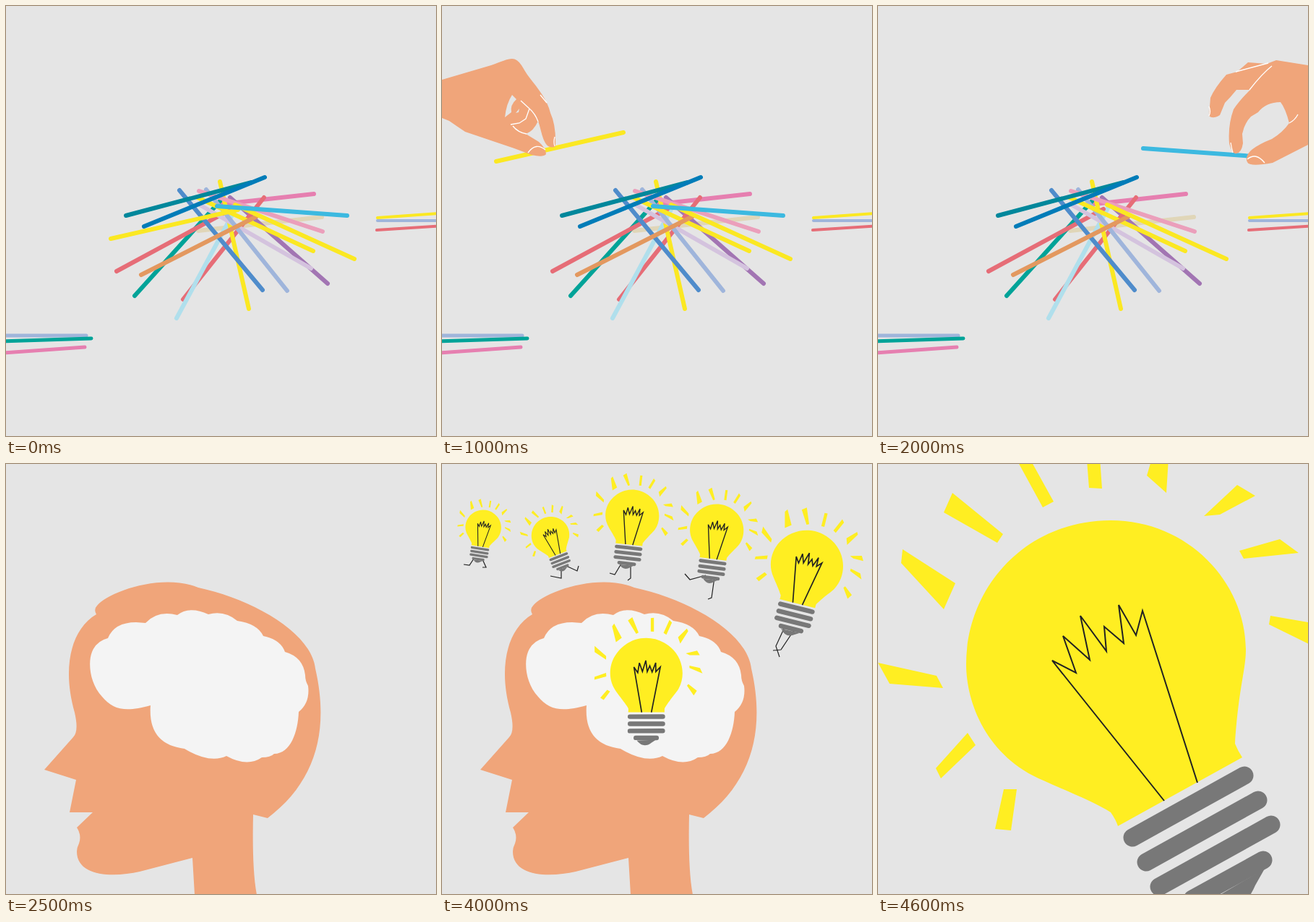
An HTML page for the animation above (5.1 s loop, 595 by 595 pixels).

```html
<!DOCTYPE html>
<html lang="en">
<head>
<meta charset="utf-8">
<title>Picking up ideas</title>
<style>
  html, body { margin: 0; height: 100%; overflow: hidden; background: #e5e5e5; }
  svg { display: block; width: 100vw; height: 100vh; }
  .stick { fill: none; stroke-width: 6; stroke-linecap: round; }
  .skin { fill: #f0a57a; }
  .hole { fill: #e5e5e5; }
  .crease { fill: none; stroke: #fff; stroke-width: 1.3; }
  .legs { fill: none; stroke: #222; stroke-width: 1.2; }
  .glow { fill: #ffee22; }
  .ridge { fill: none; stroke: #787878; stroke-width: 25; stroke-linecap: round; }
  .wire { fill: none; stroke: #222; vector-effect: non-scaling-stroke; }
</style>
</head>
<body>
<!-- data-t: start and end of visibility in ms -->
<svg viewBox="0 0 595 595">
  <defs>
    <g id="bulb" transform="rotate(28.9) translate(-316 -271)">
      <path class="glow" d="M332 501Q329 492 322 482C300 468 255 450 229 438C150 405 122 330 122 277C122 170 205 78 322 78C430 78 509 165 509 257C509 285 499 310 494 387Q498 397 504 406Z"/>
      <path class="glow" d="M174 450L192 450 184 507 162 505ZM124 372L135 389 87 435 80 421ZM0 275L81 293 90 310 16 304ZM34 118L107 165 91 201 32 137ZM103 40L173 97 165 109 91 67ZM193 -4L207 -13 243 52 228 60Z"/>
      <path class="glow" d="M286 -44L305 -37 310 34 292 33ZM391 -48L404 -40 399 40 372 16ZM497 29L522 44 473 70 451 72ZM500 120L556 104 582 123 506 131ZM543 210L601 220 598 250 541 222Z"/>
      <path class="ridge" d="M352 517L507 431M371 551L526 465M389 585L544 499M435 602L533 548"/>
      <path fill="#787878" d="M535 560L522 583Q500 635 446 612Z"/>
      <path class="wire" d="M396 466L241 272 274 289 256 238 293 271 280 210 316 259 313 225 340 248 333 195 357 237 366 203 442 441"/>
    </g>
    <g id="leftHand">
      <path class="skin" d="M-40 113L0 102 68 82C82 77 90 73 97 73Q104 73 110 82C113 87 117 94 121 99C132 113 146 130 150 148Q158 165 157 194Q153 197 147 194C139 188 137 170 133 159Q127 173 116 177L134 188Q144 197 144 205Q140 210 124 206L100 197 32 174Q20 166 10 159L0 155-40 142Z"/>
      <path class="hole" d="M97 123L103 129Q94 137 96 147L87 154Q89 135 97 123ZM102 148L107 142 106 147Z"/>
      <path class="crease" d="M109 131L121 142Q129 149 133 160M121 142L116 156 107 162 95 164M98 166Q105 175 117 177M136 123L145 134M156 181Q154 189 156 194M119 203Q130 188 143 199"/>
    </g>
    <g id="rightHand">
      <path class="skin" d="M680 105L595 82 551 75 538 80 512 78 497 91 482 95Q466 113 460 127L458 152Q463 157 473 151L480 134Q488 126 496 116L515 116Q500 131 492 143Q484 165 486 190Q490 206 496 204Q503 203 505 190L504 177Q507 162 516 153L526 147Q537 133 557 133Q564 142 569 162Q560 175 545 184Q527 191 517 199Q507 208 511 216Q514 223 546 217L595 192 612 187 680 180Z"/>
      <path class="crease" d="M495 91L540 79M545 83Q532 93 514 116M458 139Q461 146 458 152M488 189Q489 196 491 203M511 212Q523 202 535 217M581 150Q577 158 569 162"/>
    </g>
  </defs>

  <g data-t="0 2500">
    <g class="stick">
      <path stroke="#e0d6b8" d="M266 311L437 292"/>
      <path stroke="#e67fb0" d="M300 274L426 260"/>
      <path stroke="#a275b3" d="M310 265L445 384"/>
      <path stroke="#e66d77" d="M245 406L357 265"/>
      <path stroke="#00a398" d="M178 401L297 269"/>
      <path stroke="#b0dfec" d="M236 432L320 276"/>
      <path stroke="#fbe822" d="M296 243L336 419"/>
      <path stroke="#e66d77" d="M153 367L312 281"/>
      <path stroke="#d4c3de" d="M266 274L422 363"/>
      <path stroke="#9fb5db" d="M277 254L389 394"/>
      <path stroke="#fbe822" d="M265 265L425 339"/>
      <path stroke="#4f8ccb" d="M240 255L355 393"/>
      <path stroke="#e3985f" d="M187 372L347 291"/>
      <path stroke="#eb9fbb" d="M267 256L438 312"/>
      <path stroke="#fbe822" d="M317 275L482 350"/>
      <path stroke="#fbe822" d="M145 322L321 282" data-t="0 1000"/>
      <path stroke="#00879b" d="M166 290L340 244"/>
      <path stroke="#007cb8" d="M191 305L358 237"/>
      <path stroke="#3cb9e0" d="M292 277L472 290" data-t="0 2000"/>
      <path stroke="#fbe822" d="M75 215L251 175" data-t="1000 1500"/>
      <path stroke="#3cb9e0" d="M367 197L547 210" data-t="2000 2500"/>
    </g>
    <g class="stick" style="stroke-width:5">
      <path stroke="#9fb5db" d="M-9 456H111"/>
      <path stroke="#00a398" d="M-9 464L118 460"/>
      <path stroke="#e67fb0" d="M-9 480.500L109 472"/>
    </g>
    <g class="stick" style="stroke-width:4">
      <path stroke="#fbe822" d="M514 293L605 286.500"/>
      <path stroke="#9fb5db" d="M514 297H605"/>
      <path stroke="#e66d77" d="M513 310L605 304"/>
    </g>
    <use href="#leftHand" x="20" y="133" data-t="500 1000"/>
    <use href="#leftHand" data-t="1000 1500"/>
    <use href="#rightHand" x="-75" y="79" data-t="1500 2000"/>
    <use href="#rightHand" data-t="2000 2500"/>
  </g>

  <g data-t="2500 4600">
    <path class="skin" d="M125 208Q121 201 126 196C140 178 215 150 266 171C340 187 422 232 428 283C448 370 428 440 362 490L342 485C341 530 342 570 347 596L261 596 258 545 185 564C150 572 98 572 98 536Q98 531 101 525Q105 514 98 503L120 482 88 482 97 437 53 423 93 378Q101 370 95 344C78 285 88 230 125 208Z"/>
    <path fill="#f4f4f4" d="M141 241Q150 219 180 219L193 220Q210 202 237 209Q254 196 280 208Q302 202 320 217Q348 221 356 238Q380 243 386 260Q411 267 414 292Q414 300 418 307Q421 330 405 343C404 370 394 401 371 401Q366 406 354 406Q334 420 305 404Q282 415 247 394Q196 388 200 334C165 344 148 340 133 322C116 304 113 275 119 260Q125 245 141 241Z"/>
    <use href="#bulb" transform="translate(282.500 290) scale(.256)" stroke-width="1.7" data-t="3000 4600"/>
    <g id="runners"></g>
  </g>

  <use href="#bulb" transform="translate(316 271) rotate(-28.9)" stroke-width="2" data-t="4600 5100"/>
</svg>
<script>
  // x, y, tilt, scale, legs
  const runners = [
    [57, 88, 9, .127, "M44 131L38 140 30 139M56 132L61 143 56 143"],
    [150, 99, -21, .135, "M165 144V158L150 155M172 141L187 148 189 141"],
    [263, 72, 6.5, .19, "M248 138L239 153 232 151M261 137V158L257 161"],
    [380, 92, 7.5, .19, "M365 154L343 160 336 152M377 157L373 185 368 187"],
    [504.5, 141, 14, .257, "M474 226L462 252 467 267M487 230L469 257 458 258"],
    [525, 342, 10.5, .257, "M500 428L461 432 478 441M518 431L548 453 535 453"],
    [455, 505, 11, .207, "M432 575L420 597M445 576L474 598 485 588"]
  ];
  document.getElementById("runners").innerHTML = runners.map(([x, y, tilt, scale, legs], i) =>
    `<g data-t="${3200 + i * 200} 4600"><path class="legs" d="${legs}"/>
     <use href="#bulb" transform="translate(${x} ${y}) rotate(${tilt}) scale(${scale})"
       stroke-width="${0.4 + scale * 5}"/></g>`).join("");

  const LOOP = 5100;
  const parts = [...document.querySelectorAll("[data-t]")].map(el => {
    const [from, to] = el.dataset.t.split(" ").map(Number);
    return { el, from, to };
  });

  function draw() {
    const t = performance.now() % LOOP;
    for (const { el, from, to } of parts)
      el.style.display = t >= from && t < to ? "" : "none";
    requestAnimationFrame(draw);
  }
  draw();
</script>
</body>
</html>
```
